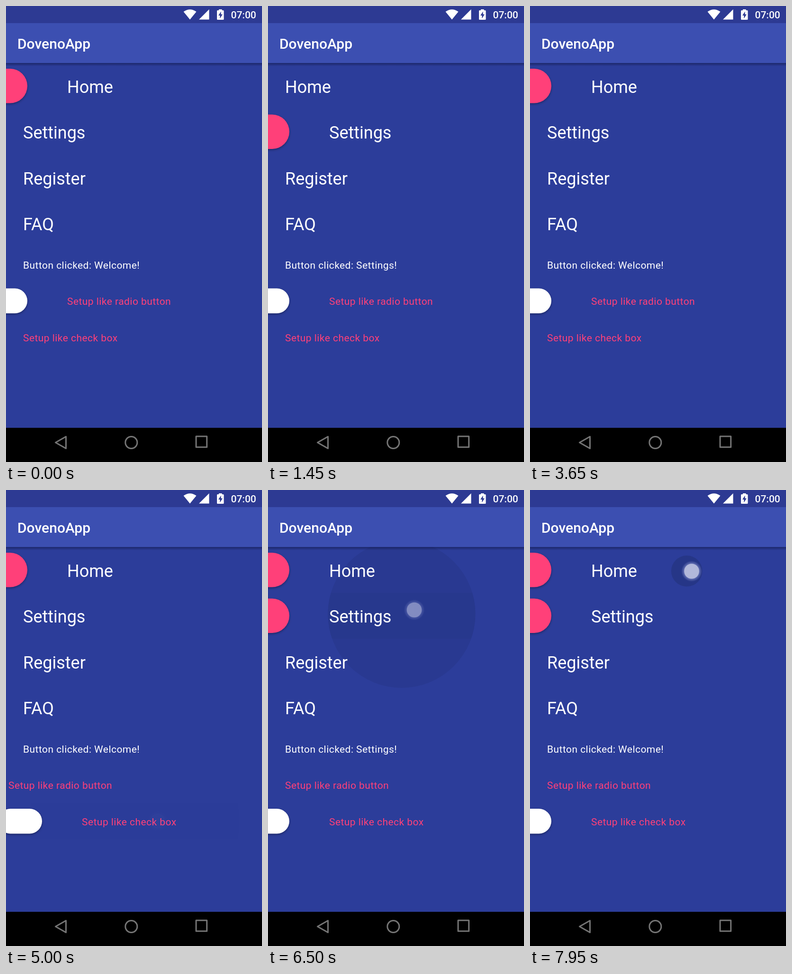
An HTML page with a canvas for the animation above (8000 ms loop, 540x960 px).

```html
<!DOCTYPE html>
<html lang="en">
<head>
<meta charset="utf-8">
<title>Sliding selection menu</title>
<style>
  html, body { margin: 0; height: 100%; overflow: hidden; background: #2c3d9a; }
  canvas { display: block; }
</style>
</head>
<body>
<canvas id="stage" width="540" height="960"></canvas>
<script>
const ctx = document.getElementById('stage').getContext('2d');
const LOOP = 8000, STEP = 50, SLIDE = 500, SHIFT = 93;
const PINK = '#ff4079', WHITE = '#fff', GREY = '#757575';

// moves: [start time, selected state to slide to]
const rows = [
  { label: 'Home', y: 168.3, on: 1, moves: [[850, 0], [3060, 1], [7950, 0]] },
  { label: 'Settings', y: 264.7, on: 0, moves: [[850, 1], [3060, 0], [6400, 1]] },
  { label: 'Register', y: 361.1, on: 0, moves: [] },
  { label: 'FAQ', y: 457.5, on: 0, moves: [] },
  { label: 'Setup like radio button', y: 620.8, on: 1, small: true, moves: [[4817, 0]] },
  { label: 'Setup like check box', y: 697.3, on: 0, small: true, moves: [[4817, 1]] },
];

const taps = [
  { down: 800, up: 850, x: 322, y: 262, row: rows[1], message: 'Settings!' },
  { down: 2950, up: 3050, x: 329.5, y: 169.5, row: rows[0], message: 'Welcome!' },
  { down: 4700, up: 4805, x: 320, y: 697, row: rows[5] },
  { down: 6300, up: 6400, x: 308.5, y: 252.5, row: rows[1], message: 'Settings!' },
  { down: 7850, up: 7933, x: 341, y: 171, row: rows[0], message: 'Welcome!' },
];

function overshoot(p) {
  const u = Math.min(p, 1) - 1;
  return u * u * (5 * u + 4) + 1;
}

function selection(row, t) {
  let value = row.on;
  for (const [start, to] of row.moves) {
    if (t >= start) value = 1 - to + (2 * to - 1) * overshoot((t - start) / SLIDE);
  }
  return value;
}

function text(str, x, y, size, color = WHITE, weight = 400, spacing = 0) {
  ctx.font = `${weight} ${size}px Roboto, sans-serif`;
  ctx.letterSpacing = spacing + 'px';
  ctx.fillStyle = color;
  ctx.fillText(str, x, y);
}

function rect(color, x, y, w, h) {
  ctx.fillStyle = color;
  ctx.fillRect(x, y, w, h);
}

function disc(color, x, y, r) {
  ctx.fillStyle = color;
  ctx.beginPath();
  ctx.arc(x, y, r, 0, 2 * Math.PI);
  ctx.fill();
}

function polygon(...points) {
  ctx.beginPath();
  points.forEach(([x, y]) => ctx.lineTo(x, y));
  ctx.closePath();
}

function clipped(top, height, draw) {
  ctx.save();
  ctx.beginPath();
  ctx.rect(0, top, 540, height);
  ctx.clip();
  draw();
  ctx.restore();
}

function drawRipple({ up, x, y, row }, t) {
  const age = t - up;
  if (age < 0 || age > 260) return;
  const grow = 1 - (1 - Math.min(age / 225, 1)) ** 2;
  const fade = 1 - age / 260;
  const circle = alpha => disc(`rgba(20,30,60,${alpha * fade})`,
    x + (270 - x) * grow, y + (row.y - y) * grow, 225 * grow);
  if (!row.small) circle(0.15);
  const height = row.small ? 76 : 96.4;
  clipped(row.y - height / 2, height, () => circle(0.07));
}

function drawTouch({ down, up, x, y }, t) {
  if (t < down || t > up + 200) return;
  ctx.globalAlpha = t < up ? 1 : 1 - (t - up) / 200;
  const halo = ctx.createRadialGradient(x, y, 15, x, y, 22);
  halo.addColorStop(0, 'rgba(160,168,222,.6)');
  halo.addColorStop(1, 'rgba(160,168,222,0)');
  disc(halo, x, y, 22);
  disc('#b9bedd', x, y, 15.8);
  ctx.globalAlpha = 1;
}

function drawRow(row, t) {
  const shift = SHIFT * selection(row, t);
  const height = row.small ? 52.5 : 72.5;
  ctx.save();
  ctx.shadowColor = 'rgba(0,0,0,.35)';
  ctx.shadowBlur = 5;
  ctx.shadowOffsetY = 2;
  ctx.fillStyle = row.small ? WHITE : PINK;
  ctx.beginPath();
  ctx.roundRect(shift - 141, row.y - height / 2, 93, height, height / 2);
  ctx.fill();
  ctx.restore();
  if (row.small) text(row.label, 36 + shift, row.y + 8.2, 21, PINK, 400, 0.45);
  else text(row.label, 36 + shift, row.y + 14.7, 36);
}

function drawStatusBar() {
  rect('#2d3a93', 0, 0, 540, 36);
  ctx.fillStyle = WHITE;
  ctx.beginPath();
  ctx.moveTo(388, 28.5);
  ctx.lineTo(374.5, 12);
  ctx.quadraticCurveTo(388, 2.5, 401.5, 12);
  ctx.fill();
  polygon([407, 28.5], [428.5, 28.5], [428.5, 7]);
  ctx.fill();
  ctx.beginPath();
  ctx.roundRect(445, 9, 14.5, 20, 1.5);
  ctx.rect(449, 7, 6.5, 3);
  ctx.fill();
  ctx.fillStyle = '#2d3a93';
  polygon([453.5, 11.5], [448, 20], [451.3, 20], [451.3, 26.5], [456.8, 17.5], [453.5, 17.5]);
  ctx.fill();
  text('07:00', 474.5, 26, 21, WHITE, 500);
}

function drawAppBar() {
  const shadow = ctx.createLinearGradient(0, 120, 0, 127);
  shadow.addColorStop(0, 'rgba(0,0,20,.36)');
  shadow.addColorStop(1, 'rgba(0,0,20,0)');
  rect(shadow, 0, 120, 540, 7);
  rect('#3c4fb1', 0, 36, 540, 84);
  text('DovenoApp', 24, 90, 30, WHITE, 500);
}

function drawNavBar() {
  rect('#000', 0, 888, 540, 72);
  ctx.strokeStyle = GREY;
  ctx.lineWidth = 3;
  ctx.lineJoin = 'round';
  polygon([104.5, 919], [126.5, 906.5], [126.5, 931.5]);
  ctx.stroke();
  ctx.beginPath();
  ctx.arc(264.3, 919, 12.5, 0, 2 * Math.PI);
  ctx.stroke();
  ctx.strokeRect(401, 906, 22.7, 22.7);
}

function draw(t) {
  rect('#2c3d9a', 0, 0, 540, 960);
  clipped(120, 768, () => {
    taps.forEach(tap => drawRipple(tap, t));
    rows.forEach(row => drawRow(row, t));
    const last = taps.filter(tap => tap.message && t >= tap.up).pop();
    text('Button clicked: ' + (last ? last.message : 'Welcome!'), 36, 552.7, 21, WHITE, 400, 0.45);
  });
  drawAppBar();
  drawStatusBar();
  drawNavBar();
  taps.forEach(tap => drawTouch(tap, t));
}

const begin = performance.now();
function tick() {
  const t = (performance.now() - begin) % LOOP;
  draw(Math.floor(t / STEP) * STEP);
  requestAnimationFrame(tick);
}
tick();
</script>
</body>
</html>
```
